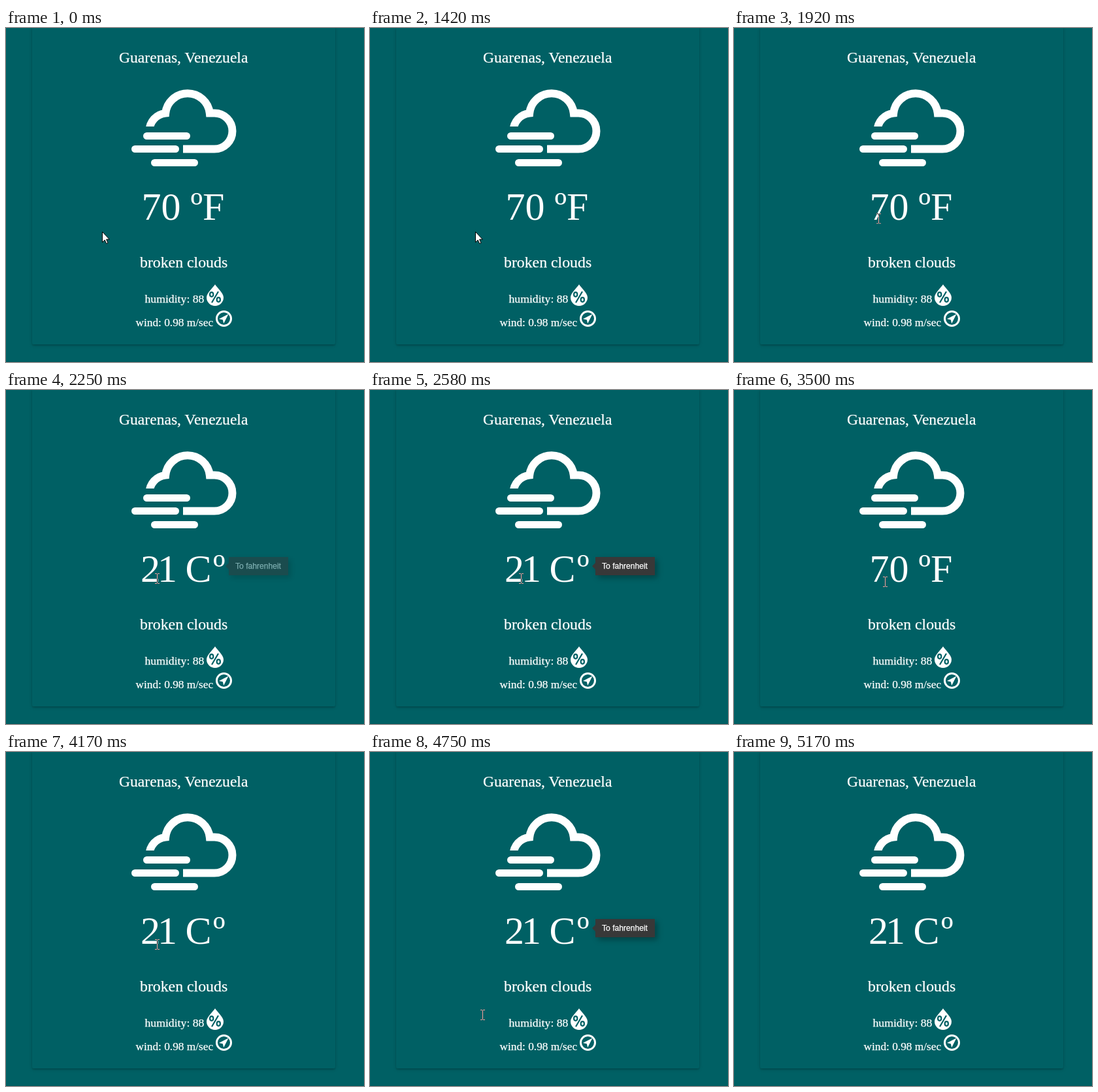
Write an HTML page that moves like this. It is 548 px wide and 512 px high and loops after 5830 ms.

```html
<!DOCTYPE html>
<html lang="en">
<head>
<meta charset="utf-8">
<title>Weather card</title>
<style>
  html, body { margin: 0; width: 100%; height: 100%; overflow: hidden; background: #006064; }
  svg { display: block; width: 548px; height: 512px; }
  text { fill: #fff; font-family: "Liberation Serif", "Times New Roman", serif; }
  .label { stroke: #fff; stroke-width: .25; }
  .card {
    fill: #006064;
    filter: drop-shadow(0 2px 1px rgba(0,0,0,.14)) drop-shadow(0 1px 2.5px rgba(0,0,0,.14));
  }
  .line { fill: none; stroke: #fff; stroke-width: 12; }
  .bar { stroke: #fff; stroke-width: 11; stroke-linecap: round; }
  .temp { font-size: 60px; }
  .tip text { font: 12.1px "Liberation Sans", Arial, sans-serif; }
  .tip path { fill: #383838; filter: drop-shadow(4px 4px 4px rgba(0,0,0,.3)); }

  .temp, .tip, .arrow, .beam { animation: 5830ms step-end infinite; }
  .f { animation-name: fahrenheit; }
  .c { animation-name: celsius; }
  .tip { animation-name: tip; }
  .arrow { animation-name: move, arrow; }
  .beam { animation-name: move, beam; mix-blend-mode: difference; }

  @keyframes fahrenheit {
    0%, 52.82% { opacity: 1; }
    35.67%, 71.52%, 100% { opacity: 0; }
  }
  @keyframes celsius {
    0%, 52.82% { opacity: 0; }
    35.67%, 71.52%, 100% { opacity: 1; }
  }
  @keyframes tip {
    0%, 52.82% { opacity: 0; transform: translateX(-8px); }
    35.67%, 71.52% { opacity: 0; transform: translateX(-8px); animation-timing-function: steps(2); }
    38.58%, 74.43% { opacity: .48; transform: translateX(-4px); animation-timing-function: steps(4); }
    44.25%, 80.1% { opacity: 1; transform: none; }
    81.47% { opacity: 1; transform: none; animation-timing-function: steps(5); }
    88.67%, 100% { opacity: 0; transform: translateX(-8px); }
  }
  @keyframes move {
    0% { transform: translate(147px, 312px); }
    5.66% { transform: translate(151px, 312px); }
    24.35% { transform: translate(161px, 312px); animation-timing-function: steps(7); }
    34.3% { transform: translate(231px, 289px); }
    52.82% { transform: translate(231px, 289px); animation-timing-function: steps(5); }
    60.03% { transform: translate(231px, 294px); }
    71.52% { transform: translate(231px, 295px); }
    75.8% { transform: translate(231px, 295px); animation-timing-function: steps(4); }
    81.47% { transform: translate(172px, 403px); animation-timing-function: steps(3); }
    85.75% { transform: translate(91px, 508px); }
    87.1%, 100% { transform: translate(80px, 540px); }
  }
  @keyframes arrow {
    0%, 77.2%, 84.3%, 100% { opacity: 1; }
    28.6%, 78.6% { opacity: 0; }
  }
  @keyframes beam {
    0%, 77.2%, 84.3%, 100% { opacity: 0; }
    28.6%, 78.6% { opacity: 1; }
  }
</style>
</head>
<body>
<svg viewBox="0 0 548 512">
  <rect width="548" height="512" fill="#006064"/>
  <rect class="card" x="40" y="-2" width="464" height="487" rx="2"/>
  <rect y="511" width="548" height="1" fill="#00565a"/>

  <text class="label" x="173" y="53" font-size="23.6">Guarenas, Venezuela</text>

  <path class="line" d="M219.5 158A27.5 27.5 0 0 1 244.2 130.6A34 34 0 0 1 311.8 130.5H319A27.5 27.5 0 0 1 319 185.5H271"/>
  <!-- trims the left end of the cloud level -->
  <rect x="208" y="151" width="24" height="9" fill="#006064"/>
  <path class="bar" d="M215.5 165.5H276.5M197.5 185.5H259.5M227.5 206.5H288.5"/>

  <text class="temp f" x="207.5" y="294">70 ºF</text>
  <text class="temp c" x="206" y="294">2<tspan x="232">1</tspan><tspan x="274.5">C</tspan><tspan x="317">º</tspan></text>

  <text class="label" x="205" y="367" font-size="23.8">broken clouds</text>
  <text class="label" x="212.5" y="421" font-size="17.7">humidity: 88</text>
  <text class="label" x="198.5" y="457" font-size="17.3">wind: 0.98 m/sec</text>

  <path fill="#fff" d="M320 393C322 397 333 406 333 413A13 13 0 0 1 307 413C307 406 318 397 320 393Z"/>
  <g fill="none" stroke="#006064" stroke-width="2.2">
    <ellipse cx="314.7" cy="408.5" rx="2.6" ry="3.3"/>
    <ellipse cx="325.3" cy="416.5" rx="2.6" ry="3.3"/>
    <path d="M325 404L315 421"/>
  </g>

  <circle cx="333.5" cy="445.5" r="11" fill="none" stroke="#fff" stroke-width="3"/>
  <path fill="#fff" d="M340.5 438.5L326 446L331.8 447.3L333.2 453Z"/>

  <g class="tip">
    <path d="M345 256H436V284H345V275L340 270L345 265Z"/>
    <text class="label" x="355" y="274">To fahrenheit</text>
  </g>

  <path class="arrow" fill="#fff" stroke="#000" d="M.5 .5V16.5L4.2 13L6.7 18.5L9 17.5L6.6 12H11.3Z"/>
  <path class="beam" fill="#fff" shape-rendering="crispEdges" d="M-3 -8H0V-7H1V-8H4V-7H1V7H4V8H1V7H0V8H-3V7H0V-7H-3Z"/>
</svg>
</body>
</html>
```
